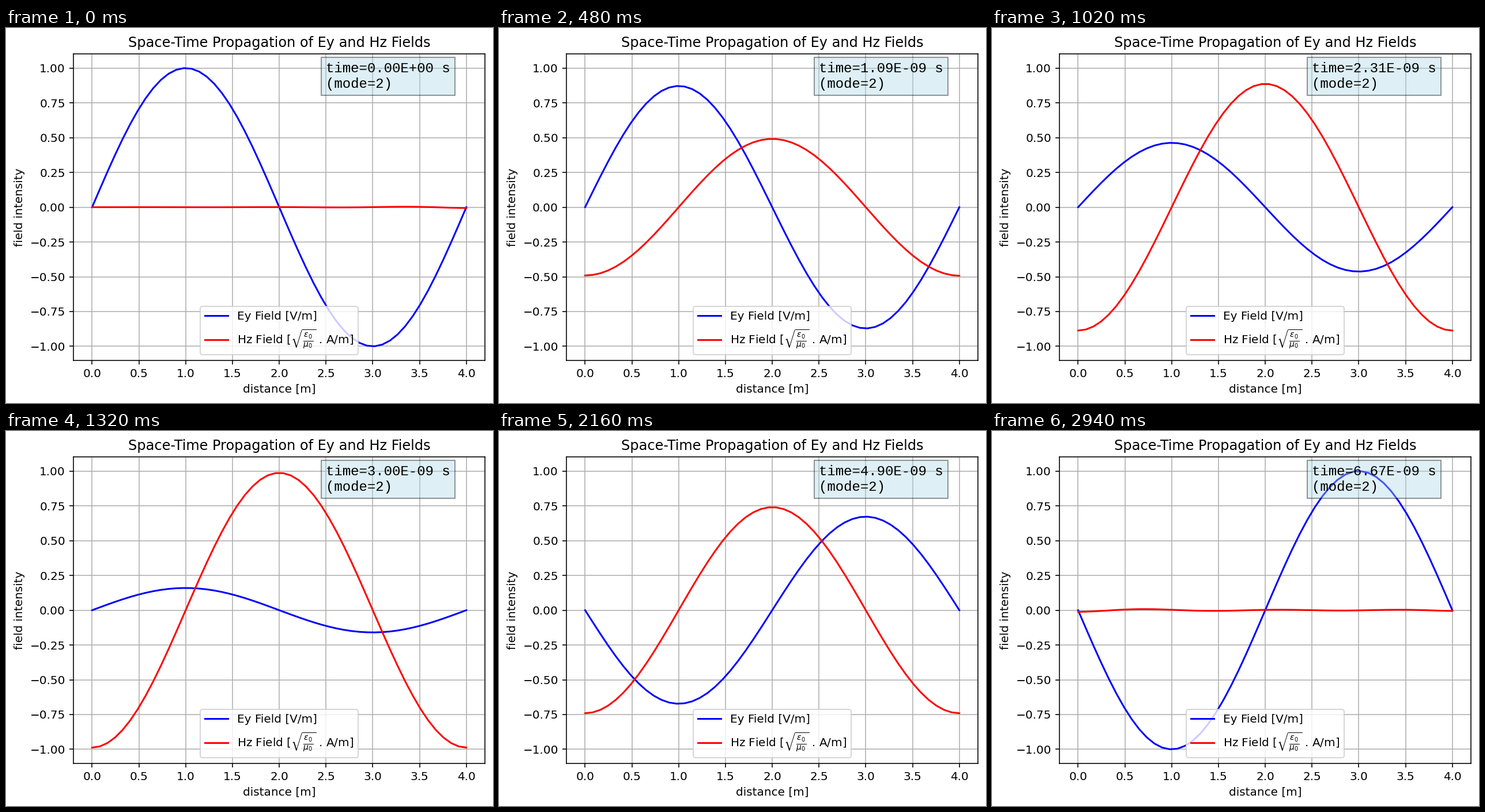
Write a matplotlib script that moves like this. It is 845x652 px and loops after 3 s.

```python
import numpy as np
import matplotlib.pyplot as plt
from matplotlib.animation import FuncAnimation

W, H, DPI = 845, 652, 144
FRAMES, INTERVAL = 50, 60
LENGTH, MODE = 4.0, 2
LIGHT_SPEED = 299792458.0
HALF_PERIOD = LENGTH / MODE / LIGHT_SPEED

x = np.linspace(0, LENGTH, 50)
k = MODE * np.pi / LENGTH


def ripple(dist, size, reach, half_wave):
    """Small decaying error of the solved field near a wall."""
    return -size * np.exp(-dist / reach) * np.cos(np.pi * dist / half_wave)


def fields(i):
    u = i / (FRAMES - 1)
    phase = np.pi * u
    ey = np.sin(k * x) * np.cos(phase)
    hz = -np.cos(k * x) * np.sin(phase)
    near_end = np.cos(phase) ** 8
    hz += near_end * ripple(LENGTH - x, 0.006, 1.0, 0.7)
    hz += near_end * u ** 4 * ripple(x, 0.012, 1.6, 0.75)
    return ey, hz


def stamp(i):
    t = i / (FRAMES - 1) * HALF_PERIOD
    return f"time={t:.2E} s\n(mode={MODE})"


plt.rcParams["font.family"] = "DejaVu Sans"
fig = plt.figure(figsize=(W / DPI, H / DPI), dpi=DPI)
ax = fig.add_axes([116.95 / W, 74.33 / H, 714.24 / W, 532.224 / H])
ax.set_xlim(-0.2, 4.2)
ax.set_ylim(-1.1, 1.1)
ax.set_yticks(np.arange(-1, 1.01, 0.25))
ax.grid(True)
ax.set_title("Space-Time Propagation of Ey and Hz Fields")
ax.set_xlabel("distance [m]")
ax.set_ylabel("field intensity")

ey_line, = ax.plot([], [], "b", label="Ey Field [V/m]")
hz_line, = ax.plot(
    [], [], "r",
    label=r"Hz Field [$\sqrt{\frac{\varepsilon_0}{\mu_0}}$ . A/m]")
ax.legend(loc="lower center")
label = ax.text(2.5, 0.858, "", family="Liberation Mono", size=12,
                bbox=dict(facecolor="lightblue", alpha=0.4))


def update(i):
    ey, hz = fields(i)
    ey_line.set_data(x, ey)
    hz_line.set_data(x, hz)
    label.set_text(stamp(i))
    return ey_line, hz_line, label


anim = FuncAnimation(fig, update, frames=FRAMES, interval=INTERVAL,
                     init_func=lambda: update(0), repeat=True)
plt.show()
```
